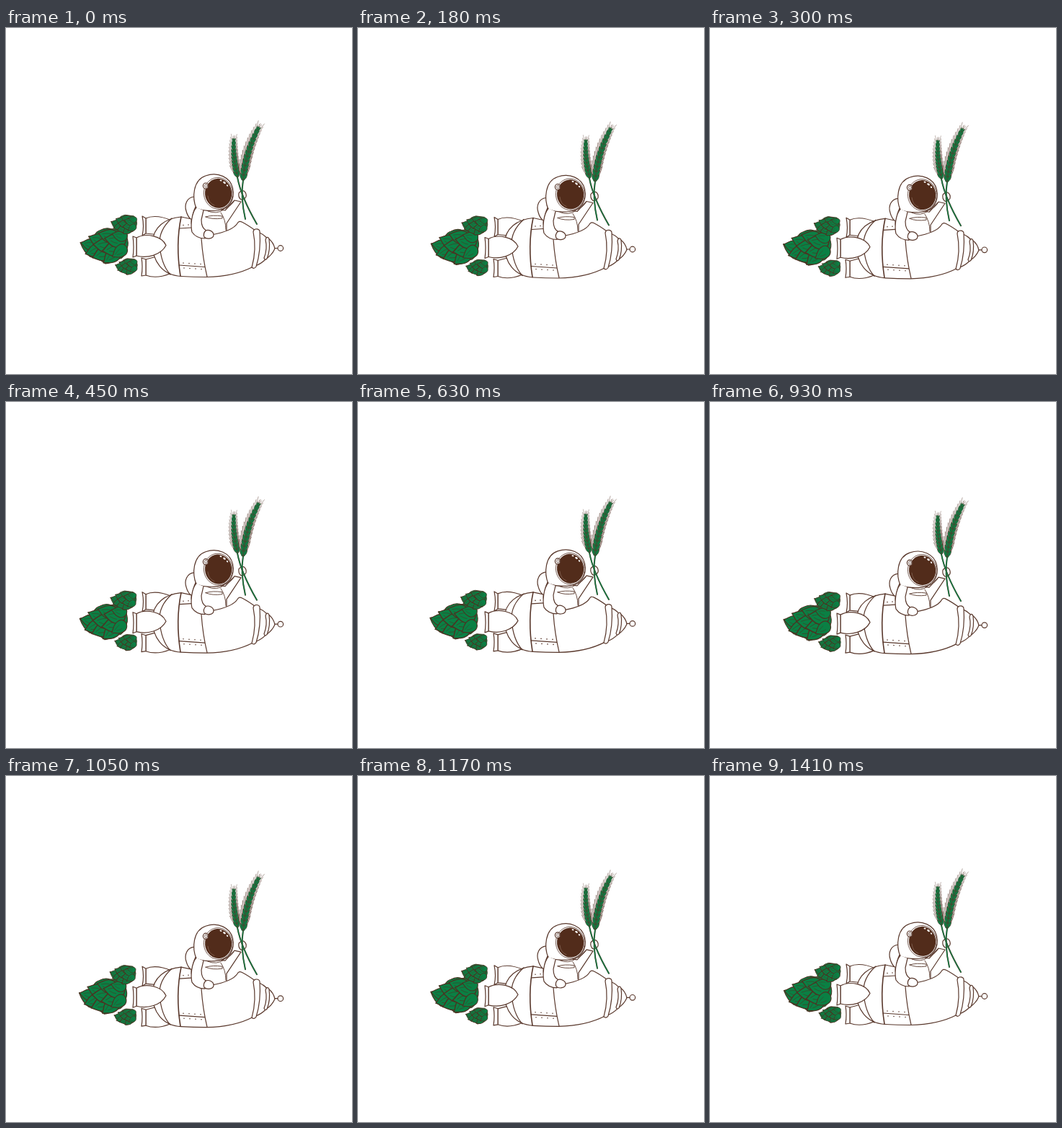
These frames come from a looping animation (480 px wide and 480 px high, 1.44 s). An HTML page with a canvas:

```html
<!DOCTYPE html>
<html lang="en">
<head>
<meta charset="utf-8">
<title>Rocket ride</title>
<style>
  html, body { margin: 0; width: 100%; height: 100%; overflow: hidden; background: #fff; }
  canvas { display: block; width: 100vw; height: 100vh; }
</style>
</head>
<body>
<canvas id="stage" width="480" height="480"></canvas>
<script>
const ctx = document.getElementById('stage').getContext('2d');
const BROWN = '#59382c', VISOR = '#522c1b', GREEN = '#0a8044', VEIN = '#4a3422', WHITE = '#fff';
const LOOP = 1440, STEP = 30;

// time, hop sway, vertical drift
const POSES = [
  [90, 0, 0], [180, -1.8, 1.5], [450, -0.8, 2.7], [630, -3.2, 1.9],
  [930, -1, 4.1], [1170, -2.2, 1.8], [1410, -0.5, 0], [1440, 0, 0]
];

function slope(i, k) {
  if (i === 0 || i === POSES.length - 1) return 0;
  const [a, b, c] = [POSES[i - 1], POSES[i], POSES[i + 1]];
  if ((b[k] - a[k]) * (c[k] - b[k]) <= 0) return 0;
  return (c[k] - a[k]) / (c[0] - a[0]);
}

function valueAt(t, k) {
  if (t <= POSES[0][0]) return POSES[0][k];
  const i = POSES.findIndex(p => p[0] > t) - 1;
  const a = POSES[i], b = POSES[i + 1], span = b[0] - a[0], u = (t - a[0]) / span;
  const ease = u * u * (3 - 2 * u);
  return a[k] + (b[k] - a[k]) * ease +
    span * (slope(i, k) * u * (1 - u) ** 2 - slope(i + 1, k) * u * u * (1 - u));
}

function shape(d, fill, stroke = BROWN, width = 1.2) {
  const path = new Path2D(d);
  if (fill) { ctx.fillStyle = fill; ctx.fill(path); }
  if (stroke) { ctx.strokeStyle = stroke; ctx.lineWidth = width; ctx.stroke(path); }
}

function oval(x, y, rx, ry, angle, fill, stroke = BROWN, width = 1.2) {
  ctx.beginPath();
  ctx.ellipse(x, y, rx, ry, angle, 0, Math.PI * 2);
  if (fill) { ctx.fillStyle = fill; ctx.fill(); }
  if (stroke) { ctx.strokeStyle = stroke; ctx.lineWidth = width; ctx.stroke(); }
}

function place(x, y, angle, scale, draw) {
  ctx.save();
  ctx.translate(x, y);
  ctx.rotate(angle);
  ctx.scale(scale, scale);
  draw();
  ctx.restore();
}

// x, y of the centre, angle, scale; tip side first so the base overlaps it
const SCALES = [
  [-20, -3, 0.12, 1.05], [-12, 6, -0.35, 1.2], [-8, -9, 0.3, 1.2],
  [-1, 10, -0.4, 1.35], [1, -2, 0, 1.35], [6, -15, 0.2, 1.2],
  [11, 13, -0.75, 1.25], [14, 3, -0.25, 1.4], [16, -9, 0.1, 1.3],
  [22, -15, 0.2, 0.95], [22, 7, -0.65, 1.05]
];

function hop(x, y, scale, angle = 0) {
  place(x, y, angle, scale, () => {
    const line = 1.1 / Math.sqrt(scale);
    shape('M-33 -6 Q-22 -7 -14 -15 Q-10 -22 -5 -23 Q2 -27 9 -25 L24 -24 Q31 -20 31 -15 ' +
          'Q35 -5 32 2 Q30 12 24 16 L15 18 Q9 23 2 23.5 L-7 17 L-19 14 Q-28 8 -33 -6Z', GREEN, VEIN, line);
    for (const [sx, sy, turn, size] of SCALES) {
      place(sx, sy, turn, size, () => {
        shape('M-12 -1 C-7 -3 -5 -8 3 -8 C10 -8 11 -4 11 0 C10 6 5 9 -1 7 C-6 6 -8 2 -12 -1Z', GREEN, VEIN, line);
        shape('M-7 -1 Q-2 -3 2 -3 M-5 1 Q-1 3 2 3', null, VEIN, line * 0.4);
      });
    }
  });
}

function ear(x0, y0, cx, cy, x1, y1, rows, size) {
  const spots = Array.from({ length: rows + 1 }, (_, i) => {
    const u = i / rows, v = 1 - u;
    return {
      x: v * v * x0 + 2 * u * v * cx + u * u * x1,
      y: v * v * y0 + 2 * u * v * cy + u * u * y1,
      angle: Math.atan2(v * (cx - x0) + u * (x1 - cx), -(v * (cy - y0) + u * (y1 - cy))),
      grain: size * (1 - 0.4 * u * u)
    };
  });
  const eachSide = draw => spots.forEach(s => place(s.x, s.y, s.angle, s.grain, () => {
    draw(-1);
    draw(1);
  }));
  eachSide(side => shape(`M${side * 3} -3 Q${side * 6} -9 ${side * 7} -17`, null, BROWN, 0.6));
  shape(`M${x0} ${y0} Q${cx} ${cy} ${x1} ${y1}`, null, GREEN, 5 * size);
  eachSide(side => shape(`M0 2 Q${side * 5} 0 ${side * 4.4} -7 Q${side} -6 0 2Z`, GREEN, BROWN, 0.6));
  const tip = spots[rows];
  place(tip.x, tip.y, tip.angle, tip.grain, () => {
    shape('M0 -4 L0 -14 M-1 -4 L-2 -12 M1 -4 L3 -13', null, BROWN, 0.6);
    oval(0, -3, 1.8, 4, 0, GREEN, BROWN, 0.6);
  });
}

function wheat() {
  for (const stem of ['M321 207 Q326 234 348 272', 'M329 211 Q325 234 332 265']) {
    shape(stem, null, BROWN, 2);
    shape(stem, null, GREEN, 1.3);
  }
  ear(321, 205, 315, 182, 316, 157, 9, 0.95);
  ear(329, 209, 333, 172, 349, 141, 11, 1.12);
}

function fins() {
  shape('M194 264 C205 259 218 262 230 267 L213 287 L194 285Z', WHITE);
  shape('M189 261 L194 264 L194 285 L189 288 Q192 275 189 261Z', WHITE);
  shape('M194 321 L209 317 L227 341 C217 345 205 347 194 343Z', WHITE);
  shape('M188 319 L194 321 L194 343 L188 344 Q190 331 188 319Z', WHITE);
}

function hull() {
  shape('M243 262 C221 264 204 276 203 298 C203 324 217 343 243 344.5 Q260 345.5 278 345.5 ' +
        'C306 345 326 340 343 331 Q351 306 346 281 Q335 273 327 269 Q323 267 321 271 ' +
        'C316 279 301 284 285 287 L266 288 Q256 276 257 265Z', WHITE);
  shape('M230 264 Q212 280 213 300 Q215 328 228 342', null);
  shape('M243 262 Q235 300 242 344', null, BROWN, 1.6);
  shape('M271 292 Q273 320 279 345 M240 329 L276 331.5 M241 278 L257 277', null);
  for (let i = 0; i < 4; i++) {
    oval(246 + i * 8, 326 + i * 0.5, 0.8, 0.8, 0, BROWN, null);
    oval(247 + i * 8, 333 + i * 0.5, 0.8, 0.8, 0, BROWN, null);
  }
  oval(246, 273.5, 0.8, 0.8, 0, BROWN, null);
  oval(253, 273, 0.8, 0.8, 0, BROWN, null);
  shape('M181 291 C194 284 216 288 222 301.5 C215 315 196 320 181 316Z', WHITE);
  shape('M176 289 L181 291 L181 316 L176 318 Q178 304 176 289Z', WHITE);
}

function nose() {
  shape('M350 283 Q357 286 363 292 L360 321 Q354 327 346 330Z', WHITE);
  shape('M364 292 Q371 297 373 306 Q369 315 361 320Z', WHITE);
  shape('M346 279 Q351 278 352 282 Q354 309 347 331 Q344 335 341 332 Q348 307 343 283 Q343 280 346 279Z', WHITE);
  shape('M361 291 Q364 289 365 293 Q367 308 362 320 Q359 323 358 319 Q363 306 360 294Z', WHITE);
  shape('M373 305.5 L377 305.5', null);
  oval(380.8, 305.5, 3.8, 3.8, 0, WHITE);
}

function rider() {
  shape('M261 234 C251 235 247 245 250 254 Q252 262 258 267 L266 250Z', WHITE);
  shape('M263 248 Q256 262 258 291 L306 291 L306 271 L326 241 L317 239 L304 253Z', WHITE);
  shape('M298 256 Q305 266 305 280 M280 254 Q292 259 302 252 M296 252 Q309 251 316 241', null, BROWN, 0.9);
  shape('M277 262 Q287 259 300 261 L300 264 Q286 266 277 262Z', null, BROWN, 0.9);
}

function helmet() {
  shape('M264 250 C258 236 259 211 277 205 C294 199 311 207 314.5 222 C318 239 309 251 294 253 Q278 255 264 250Z', WHITE);
  oval(294.3, 229.3, 19.9, 21.9, -0.1, WHITE, BROWN, 0.8);
  oval(294.6, 229.3, 18.6, 20.5, -0.1, VISOR, null);
  oval(277, 219, 3.6, 4, 0, WHITE);
  oval(277.5, 219, 1.8, 2.2, 0, null, BROWN, 0.8);
  shape('M280 233 Q281 243 289 246', null, '#8a6a5b', 0.7);
  oval(298, 211.5, 1.5, 1, 0.3, WHITE, null);
  oval(303, 214.5, 2, 1.3, 0.6, WHITE, null);
  oval(307, 218.5, 1.4, 1, 0.9, WHITE, null);
}

function arms() {
  shape('M264 249 C257 257 256 275 258 283 Q264 292 276 292 L278 281 Q271 278 271 266 L274 253', WHITE);
  shape('M277 281 C281 279 288 282 288 287 C288 292 279 294 275 290 Q273 285 277 281Z', WHITE);
}

function hand() {
  shape('M323 229 Q326 225 330 226 Q334 229 333 234 Q330 239 326 238 Q322 235 323 229Z', WHITE);
}

function render(t) {
  const sway = valueAt(t, 1), drift = valueAt(t, 2);
  ctx.fillStyle = WHITE;
  ctx.fillRect(0, 0, 480, 480);
  ctx.save();
  ctx.translate(0, drift);
  fins();
  rider();
  hull();
  nose();
  helmet();
  arms();
  hand();
  wheat();
  ctx.translate(sway, 0);
  hop(136, 303.5, 1);
  hop(163.5, 273, 0.54, 0.06);
  hop(167, 331.5, 0.46);
  ctx.restore();
}

ctx.lineCap = ctx.lineJoin = 'round';
const start = performance.now();
function tick() {
  const t = (performance.now() - start) % LOOP;
  render(Math.floor(t / STEP) * STEP);
  requestAnimationFrame(tick);
}
tick();
</script>
</body>
</html>
```
